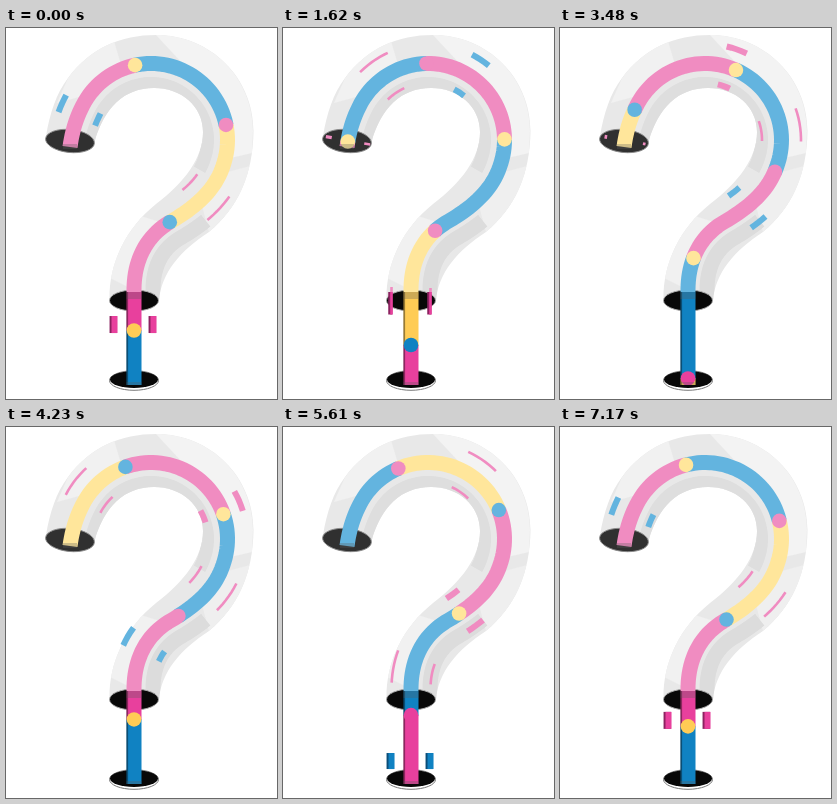
Recreate the animation shown at these times as an HTML page with a canvas. Size 271 px wide and 371 px high, loop 7.2 s.

```html
<!DOCTYPE html>
<html lang="en">
<head>
<meta charset="utf-8">
<title>Question mark tube</title>
<style>
  html, body { margin: 0; width: 100%; height: 100%; overflow: hidden; background: #fff; }
  canvas { position: absolute; left: 0; top: 0; }
</style>
</head>
<body>
<canvas id="tube" width="271" height="371"></canvas>
<canvas id="flow" width="271" height="371"></canvas>
<script>
const context = id => document.getElementById(id).getContext('2d');
const back = context('tube'), front = context('flow');
const LOOP = 7200, STEP = 37.5, GAP = 121, CYCLE = 5 * GAP;
const MOUTH = 264, FLOOR = 357;

const LIGHT = { pink: '#f08cc1', blue: '#63b4df', yellow: '#ffe69b' };
const VIVID = { pink: '#e8409d', blue: '#1082c2', yellow: '#ffcc55' };
const SIDE = { pink: '#8c2260', blue: '#0a4d78' };

// Ribbon repeats every five joints: dot colour and the colour that follows it downstream
const JOINTS = [
  ['yellow', 'blue'], ['pink', 'yellow'], ['blue', 'pink'], ['yellow', 'blue'], ['pink', 'pink']
];
const FIRST_JOINT = 112;

// Pairs of dashes on both sides: place, length, width, colour
const DASHES = [
  [37, 16, 6, 'blue'], [310, 27, 2.6, 'pink'], [469, 17, 6, 'pink'], [551, 27, 2.6, 'pink']
];

// Centre line as dense points, then resampled once per pixel of length
const dense = [];
function cubic(x0, y0, x1, y1, x2, y2, x3, y3) {
  for (let i = 0; i < 200; i++) {
    const t = i / 200, s = 1 - t;
    const mix = (a, b, c, d) => s * s * s * a + 3 * s * s * t * b + 3 * s * t * t * c + t * t * t * d;
    dense.push([mix(x0, x1, x2, x3), mix(y0, y1, y2, y3)]);
  }
}
cubic(64, 119, 66, 104, 70, 91, 75.5, 80);
for (let deg = 204.7; deg < 379.9; deg += 0.4) {
  const a = deg * Math.PI / 180;
  dense.push([145 + 76.5 * Math.cos(a), 112 + 76.5 * Math.sin(a)]);
}
cubic(217, 138, 209, 162, 190, 179, 164, 194);
cubic(164, 194, 142, 207, 128, 230, 128, 262);
dense.push([128, 262], [128, 368]);

const points = [];
let next = 0, walked = 0;
for (let i = 1; i < dense.length; i++) {
  const [ax, ay] = dense[i - 1], [bx, by] = dense[i];
  const len = Math.hypot(bx - ax, by - ay);
  for (; next < walked + len; next++) {
    const t = (next - walked) / len;
    points.push({ x: ax + (bx - ax) * t, y: ay + (by - ay) * t });
  }
  walked += len;
}
const END = points.length - 1;

// Point at length u, moved sideways by off
function at(u, off = 0) {
  const i = Math.max(0, Math.min(END - 1, Math.floor(u)));
  const p = points[i], q = points[i + 1], t = u - i;
  const a = points[Math.max(0, i - 1)], b = points[Math.min(END, i + 2)];
  const dx = b.x - a.x, dy = b.y - a.y, len = Math.hypot(dx, dy);
  return [p.x + (q.x - p.x) * t + dy / len * off, p.y + (q.y - p.y) * t - dx / len * off];
}

function strip(ctx, from, to, off, width, color) {
  const a = Math.max(0, from), b = Math.min(END, to);
  if (a >= b) return;
  ctx.beginPath();
  for (let u = a; u < b; u += 4) ctx.lineTo(...at(u, off));
  ctx.lineTo(...at(b, off));
  ctx.lineWidth = width;
  ctx.strokeStyle = color;
  ctx.stroke();
}

function ellipse(ctx, x, y, rx, ry, tilt, fill, rim) {
  ctx.beginPath();
  ctx.ellipse(x, y, rx, ry, tilt, 0, 2 * Math.PI);
  ctx.fillStyle = fill;
  ctx.fill();
  if (rim) {
    ctx.lineWidth = 1;
    ctx.strokeStyle = rim;
    ctx.stroke();
  }
}

const FACETS = [
  ['M150 7C205 7 247 50 247 103L246 125L216 132L221 100L190 50Z', '#f3f3f3'],
  ['M62 50C75 32 92 19 108 13L116 40L84 66L51 75Z', '#f1f1f1'],
  ['M104 250C107 222 118 203 135 188L160 196L134 226L128 262Z', '#f1f1f1'],
  ['M203 204C224 187 238 165 244 138L218 145L195 174Z', '#efefef']
];

function drawTube() {
  const tube = new Path2D('M40 108C44 85 50 66 62 50C84 20 115 7 150 7C205 7 247.5 50 247.5 103' +
    'C247 147 232 180 203 204C175 222 155 245 153 273L103.5 271C103 235 120 200 150 176' +
    'C178 155 197 130 197 104C197 78 175 60 148 60C118 60 98 80 88.5 114Z');
  back.fillStyle = '#e8e8e8';
  back.fill(tube);
  back.save();
  back.clip(tube);
  for (const [shape, color] of FACETS) {
    back.fillStyle = color;
    back.fill(new Path2D(shape));
  }
  strip(back, 0, 290, -20, 13, '#dedede');
  strip(back, 325, 445, 19, 15, '#dcdcdc');
  back.restore();
  ellipse(back, 64, 113, 24.5, 11.5, 0.1, '#303030', '#8a8a8a');
  ellipse(back, 128, 272.5, 24.5, 10.5, 0, '#080808', '#aaa');
  ellipse(back, 128, 352.5, 24.5, 9.8, 0, '#fff', '#777');
  ellipse(back, 128, 351.5, 24, 8.5, 0, '#080808');
}

function drawFlow(shift, colors, top, bottom, solid) {
  front.save();
  front.beginPath();
  front.rect(0, top, 271, bottom - top);
  front.clip();
  const joints = [];
  for (let k = -5; k < 5; k++) {
    const [dot, band] = JOINTS[(k + 5) % 5];
    joints.push([FIRST_JOINT + k * GAP + shift, colors[dot], colors[band]]);
  }
  // The band upstream of the earliest joint is pink
  strip(front, joints[0][0] - GAP, joints[0][0], 0, 15, colors.pink);
  for (const [u, , band] of joints) strip(front, u, u + GAP + 0.5, 0, 15, band);
  if (solid) strip(front, 0, END, -6.8, 1.8, 'rgba(0,0,0,.4)');
  for (const [u, dot] of joints) {
    if (u > 4 && u < END) ellipse(front, ...at(u), 7.3, 7.3, 0, dot);
  }
  for (const [place, length, width, color] of DASHES) {
    for (const u of [place + shift - CYCLE, place + shift]) {
      const a = Math.max(5, u - length / 2), b = u + length / 2;
      for (const off of [-19.5, 19.5]) {
        if (solid) strip(front, a, b, off - 1.2, width + 1.5, SIDE[color]);
        strip(front, a, b, off, width, colors[color]);
      }
    }
  }
  front.restore();
}

function draw(step) {
  const shift = step * STEP / LOOP * CYCLE;
  front.clearRect(0, 0, 271, 371);
  drawFlow(shift, LIGHT, 0, MOUTH);
  drawFlow(shift, VIVID, MOUTH, FLOOR, true);
  // Faint shadows where the ribbon crosses the openings
  front.fillStyle = 'rgba(90,90,90,.3)';
  front.fillRect(57, 116, 14, 5);
  front.fillRect(120.5, MOUTH, 15, 7);
  front.fillRect(120.5, 354, 15, 3);
}

let shown = -1;
function tick(now) {
  const step = Math.floor(now % LOOP / STEP);
  if (step !== shown) draw(shown = step);
  requestAnimationFrame(tick);
}
drawTube();
tick(0);
</script>
</body>
</html>
```
